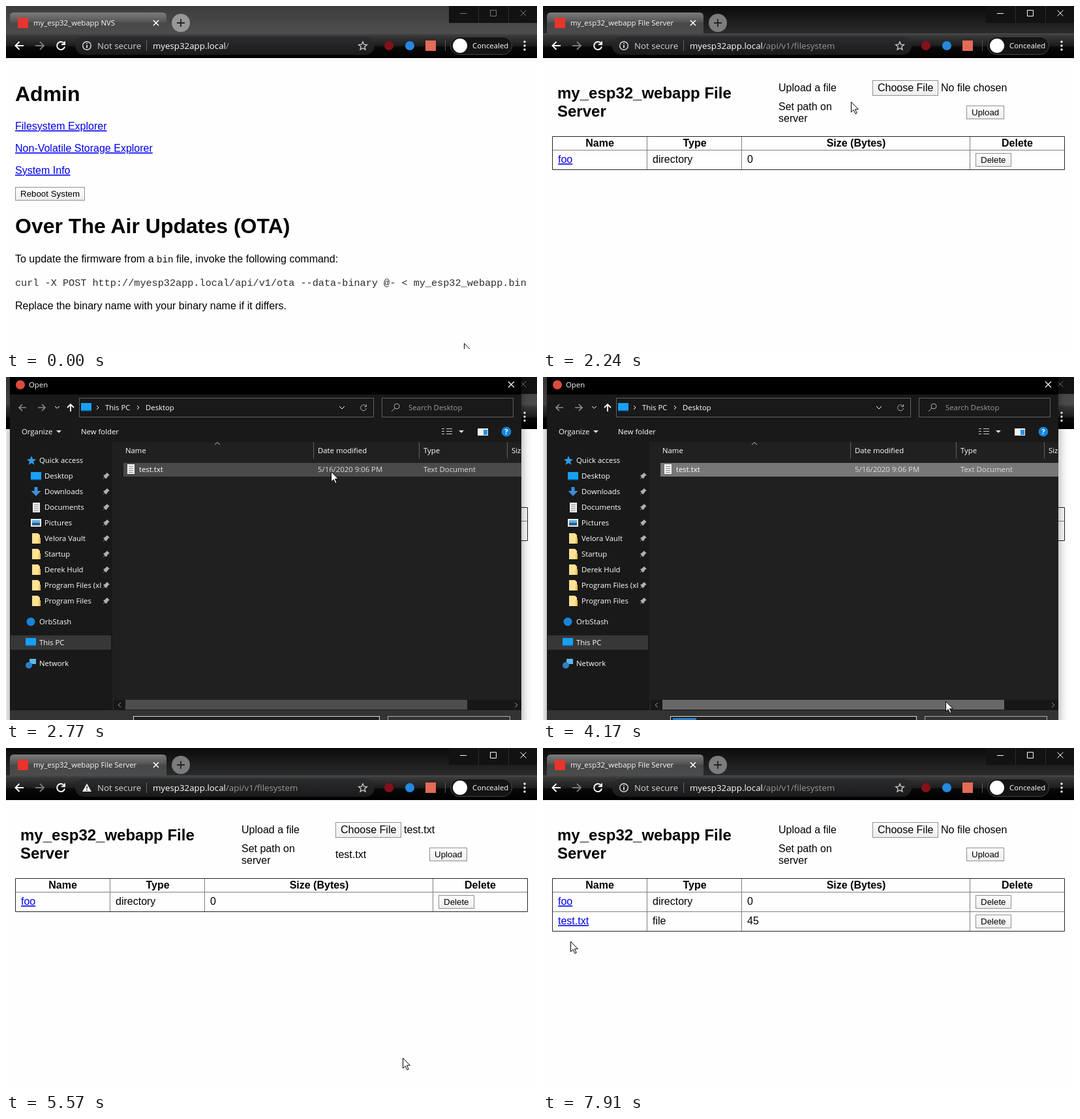
Recreate the animation shown at these times as an HTML page. Size 814 by 527 pixels, loop 7.99 s.

```html
<!DOCTYPE html>
<html lang="en">
<head>
<meta charset="utf-8">
<title>File server demo</title>
<style>
  html, body { margin: 0; width: 100%; height: 100%; overflow: hidden; background: #fefefe; }
  svg { display: block; width: 814px; height: 527px; }
  text { white-space: pre; }
  .page { font: 16px "Liberation Sans", Arial, sans-serif; }
  .page .b { font-weight: bold; }
  .page .btn { font-size: 13.333px; }
  .link { fill: #0000ee; text-decoration: underline; }
  .ui { font: 11.35px "Open Sans", "Noto Sans", sans-serif; fill: #fff; }
  .url { font-size: 13.3px; }
  .line { fill: none; stroke: #fff; }
  .dim { fill: #9a9a9a; }
</style>
</head>
<body>
<svg id="stage" viewBox="0 0 814 527" xmlns="http://www.w3.org/2000/svg"></svg>
<script>
const LOOP = 7990;

// Markup helpers
const text = (x, y, s, attrs = '') => `<text x="${x}" y="${y}" ${attrs}>${s}</text>`;
const rect = (x, y, w, h, fill, attrs = '') =>
  `<rect x="${x}" y="${y}" width="${w}" height="${h}" fill="${fill}" ${attrs}/>`;
const box = (x, y, w, h, fill, stroke, attrs = '') =>
  rect(x + .5, y + .5, w - 1, h - 1, fill, `stroke="${stroke}" ${attrs}`);
const disc = (x, y, r, fill, attrs = '') => `<circle cx="${x}" cy="${y}" r="${r}" fill="${fill}" ${attrs}/>`;
const line = (d, attrs = '') => `<path class="line" d="${d}" ${attrs}/>`;
const group = (id, body, attrs = '') => `<g id="${id}" ${attrs}>${body}</g>`;
const button = (x, y, w, h, label, base, attrs = 'class="btn"') =>
  box(x, y, w, h, 'url(#face)', '#8f8f8f') + text(x + 8, base, label, attrs);

const defs = `<defs>
  <linearGradient id="face" x2="0" y2="1"><stop stop-color="#fefefe"/><stop offset="1" stop-color="#ededed"/></linearGradient>
  <linearGradient id="stripOn" x2="0" y2="1"><stop stop-color="#0b0b0b"/><stop offset="1" stop-color="#2b2b2b"/></linearGradient>
  <linearGradient id="stripOff" x2="0" y2="1"><stop stop-color="#3d3d3d"/><stop offset="1" stop-color="#4e4e4e"/></linearGradient>
  <linearGradient id="tab" x2="0" y2="1"><stop stop-color="#7c7c7c"/><stop offset=".45" stop-color="#555"/><stop offset=".5" stop-color="#484848"/><stop offset="1" stop-color="#4c4c4c"/></linearGradient>
  <linearGradient id="bar" x2="0" y2="1"><stop stop-color="#4c4c4c"/><stop offset=".1" stop-color="#383838"/><stop offset=".5" stop-color="#1d1d1d"/><stop offset=".55" stop-color="#090909"/><stop offset="1" stop-color="#000"/></linearGradient>
  <linearGradient id="pill" x2="0" y2="1"><stop stop-color="#2b2c2e"/><stop offset="1" stop-color="#1a1a1b"/></linearGradient>
  <clipPath id="frame"><rect x="6" y="-3" width="784" height="556"/></clipPath>
  <clipPath id="side"><rect x="6" y="100" width="140" height="400"/></clipPath>
</defs>`;

function adminPage() {
  const links = ['Filesystem Explorer', 'Non-Volatile Storage Explorer', 'System Info'];
  return text(14, 146, 'Admin', 'class="b" font-size="32"')
    + links.map((s, i) => text(14, 190 + 34 * i, s, 'class="link"')).join('')
    + button(14, 278, 107, 21, 'Reboot System', 293)
    + text(14, 349, 'Over The Air Updates (OTA)', 'class="b" font-size="32"')
    + text(14, 394, 'To update the firmware from a <tspan font-family="Liberation Mono, monospace" font-size="14.2">bin</tspan> file, invoke the following command:')
    + text(14, 430, 'curl -X POST http://myesp32app.local/api/v1/ota --data-binary @- &lt; my_esp32_webapp.bin',
      'font-family="Liberation Mono, monospace" font-size="15.19" fill="#2c2c2c"')
    + text(14, 466, 'Replace the binary name with your binary name if it differs.');
}

function tableRow(y, cells) {
  const xs = [23, 168, 313];
  return line(`M14 ${y + .5}H800M159.5 ${y}v30M304.5 ${y}v30M654.5 ${y}v30`, 'style="stroke:#808080"')
    + line(`M14.5 ${y}v30.5H799.5v-30.5`, 'style="stroke:#222"')
    + cells.map((s, i) => text(xs[i], y + 20, s, i ? '' : 'class="link"')).join('')
    + button(663, y + 5, 55, 21, 'Delete', y + 20);
}

function serverPage() {
  const heads = [['Name', 87], ['Type', 232.5], ['Size (Bytes)', 480], ['Delete', 727]];
  return text(22, 142, 'my_esp32_webapp File', 'class="b" font-size="24"')
    + text(22, 170, 'Server', 'class="b" font-size="24"')
    + text(361, 131, 'Upload a file') + text(361, 160, 'Set path on') + text(361, 178, 'server')
    + rect(505, 154, 128, 20, '#ebebe4', 'id="field"')
    + button(505, 114, 101, 24, 'Choose File', 131, 'id="choose"')
    + text(610, 131, '', 'id="chosen"') + text(505, 169, '', 'id="path"')
    + button(649, 153, 58, 21, 'Upload', 168, 'class="btn" id="upload"')
    + line('M14.5 221.5V200.5H799.5V221.5', 'style="stroke:#222"')
    + line('M159.5 201v21M304.5 201v21M654.5 201v21', 'style="stroke:#808080"')
    + heads.map(([s, x]) => text(x, 216, s, 'class="b" text-anchor="middle"')).join('')
    + tableRow(221, ['foo', 'directory', '0'])
    + group('newRow', tableRow(251, ['test.txt', 'file', '45']));
}

function browser() {
  return rect(0, 0, 814, 42, '', 'id="strip"')
    + '<path d="M6 42V16q0-6 6-6H240q6 0 6 6V42z" fill="url(#tab)"/>'
    + rect(0, 42, 814, 38, 'url(#bar)')
    + rect(18, 18, 16, 16, '#e7352c', 'id="icon"')
    + line('M26 19.5a6.5 6.5 0 1 1-6.5 6.5', 'id="spin" stroke-width="2"')
    + text(42, 30, '', 'id="title"')
    + line('M226 22l8 8m0-8l-8 8', 'stroke-width="1.6"')
    + disc(268, 26, 14, '#8c8c8c', 'id="plus"') + line('M262 26h12M268 20v12', 'style="stroke:#222" stroke-width="1.8"')
    + rect(679, 0, 135, 26, '#121212') + line('M724.5 0v26M770.5 0v26', 'style="stroke:#2c2c2c"')
    + line('M696 11.5h10M742.5 6.5h9v9h-9zM788.5 6.5l9 9m0-9l-9 9', 'id="controls"')
    + line('M27 61H14.5m6-6l-6 6 6 6', 'stroke-width="2"')
    + line('M45 61H58m-6-6l6 6-6 6', 'style="stroke:#777" stroke-width="2"')
    + line('M89 57.5a6 6 0 1 0 1 5M90 54.5v4.5h-5', 'stroke-width="2"')
    + rect(106, 47, 459, 28, 'url(#pill)', 'rx="14"')
    + group('info', disc(124, 61, 6.3, 'none', 'stroke="#ddd" stroke-width="1.4"')
      + line('M124 60v4.5M124 57v1.6', 'stroke-width="1.6"'))
    + group('warn', '<path d="M124 54.5l7 12.5h-14z" fill="#eee"/>'
      + line('M124 59v3.5M124 64v1.5', 'style="stroke:#222" stroke-width="1.5"'))
    + text(140, 66, 'Not secure', 'class="url" fill="#d5d5d5"')
    + line('M215.5 53v16', 'style="stroke:#666"')
    + text(225, 66, 'myesp32app.local<tspan id="tail" fill="#999"></tspan>', 'class="url"')
    + line('M547 55l1.8 4.2 4.5.4-3.4 3 1 4.4-3.9-2.3-3.9 2.3 1-4.4-3.4-3 4.5-.4z', 'style="stroke:#ccc" stroke-width="1.4"')
    + disc(587, 61, 7, '#86101a') + disc(619, 61, 7, '#2589e0') + rect(643, 53, 16, 16, '#e36b58')
    + line('M673.5 53v16', 'style="stroke:#555"')
    + rect(681.5, 47.5, 94, 27, '#141414', 'rx="13.5" stroke="#444"') + disc(696, 61, 11, '#fff')
    + text(715, 65, 'Concealed')
    + [55, 61, 67].map(y => disc(795, y, 1.7, '#fff')).join('');
}

// File picker, drawn at its resting place
const monitor = (x, y) => rect(x - 8, y - 6, 16, 11, '#18a0f5') + rect(x - 8, y + 5, 16, 1.5, '#0a65ad');
const folder = (x, y) => `<path d="M${x - 6} ${y - 8}h9l3 3v13h-12z" fill="#ffe394"/>` + rect(x + 4, y - 1, 3, 9, '#f2c14e');
const sheet = (x, y) => rect(x - 5, y - 7, 11, 15, '#f2f2f2')
  + line([-4, -1, 2, 5].map(d => `M${x - 3} ${y + d + .5}h7`).join(''), 'style="stroke:#888"');
const pin = y => `<path d="M155 ${y - 5}l4 4-2 .5-2 3-1.5 2-2-2-3 3 2.5-4-2-2 2-1 2-1.5z" fill="#a9b2b8"/>`;
const down = (x, y) => `<path d="M${x - 2.5} ${y - 7}h5v6h5l-7.5 8-7.5-8h5z" fill="#3f8fd8"/>`;
const picture = (x, y) => rect(x - 8, y - 6, 16, 12, '#eee') + rect(x - 6, y - 4, 12, 4, '#5ab0ee') + rect(x - 6, y, 12, 4, '#315f86');
const globe = (x, y) => rect(x - 2, y - 7, 10, 8, '#5bb8ee') + disc(x - 3, y + 3, 5, '#2d7fc4');
const caret = (x, y) => `<path d="M${x - 4} ${y - 2}h8l-4 4z" fill="#ddd"/>`;

function sidebar() {
  const items = [['Desktop', monitor], ['Downloads', down], ['Documents', sheet], ['Pictures', picture],
    ['Velora Vault', folder], ['Startup', folder], ['Derek Huld', folder],
    ['Program Files (x86)', folder], ['Program Files', folder]];
  return rect(6, 100, 157, 412, '#191919')
    + rect(7, 397, 154, 22, '#373737', 'id="place"')
    + '<path d="M39 121l2 5 5 .5-4 3.5 1.5 5-4.5-3-4.5 3 1.5-5-4-3.5 5-.5z" fill="#2e9be8"/>'
    + text(51, 132, 'Quick access')
    + '<g clip-path="url(#side)">' + items.map(([s, icon], i) =>
      icon(46, 152 + 24 * i) + text(59, 156 + 24 * i, s)).join('') + '</g>'
    + items.map((_, i) => pin(152 + 24 * i)).join('')
    + disc(38, 376, 6.5, '#1685d9') + text(51, 380, 'OrbStash')
    + monitor(38, 407) + text(51, 412, 'This PC') + globe(38, 440) + text(51, 444, 'Network');
}

function picker() {
  const tools = box(112, 32, 452, 30, '#191919', '#606060') + monitor(123, 46)
    + line('M139 44l3 3-3 3M201 44l3 3-3 3M511 45l4 4 4-4M75 45l3.5 3 3.5-3')
    + text(152, 51, 'This PC') + text(214, 51, 'Desktop')
    + line('M552 45a4.5 4.5 0 1 0 .5 3M552.5 42v3.5h-3.5', 'style="stroke:#aaa"')
    + line('M31 47H20m5-5l-5 5 5 5M49 47h11m-5-5l5 5-5 5', 'style="stroke:#8b8b8b" stroke-width="1.7"')
    + line('M99 53V42m-5 5l5-5 5 5', 'stroke-width="1.8"')
    + box(576, 32, 202, 30, '#191919', '#606060')
    + disc(599, 45, 4, 'none', 'stroke="#aaa"') + line('M596 48l-5 5', 'style="stroke:#aaa"')
    + text(617, 51, 'Search Desktop', 'class="dim"')
    + text(24, 88, 'Organize') + caret(81, 84) + text(115, 88, 'New folder')
    + line('M668 79.5h4M668 83.5h4M668 87.5h4M675 79.5h9M675 83.5h9M675 87.5h9', 'style="stroke:#ccc"') + caret(698, 84);
  return '<rect x="6" y="-3" width="784" height="556" fill="#000" opacity=".4" style="filter:blur(8px)"/>'
    + '<g clip-path="url(#frame)">'
    + rect(6, -3, 784, 556, '#202020') + rect(6, -3, 784, 30, '#000') + rect(6, 70, 784, 30, '#191919')
    + rect(6, 27, 784, 43, '', 'id="address"')
    + disc(22, 12, 7, '#dd4b3e') + text(35, 16, 'Open') + line('M770 7l9 9m0-9l-9 9', 'stroke-width="1.2"')
    + group('tools', tools)
    + rect(723, 79, 16, 11, '#f2f2f2') + rect(732, 81, 6, 8, '#2294e0')
    + disc(767, 84, 7.5, '#1683d8') + text(767, 88, '?', 'text-anchor="middle" font-weight="bold"')
    + sidebar()
    + line('M320 104l4-3.5 4 3.5', 'style="stroke:#bbb"')
    + line('M471.5 100v25M633.5 100v25M768.5 100v25', 'style="stroke:#636363"')
    + text(183, 117, 'Name') + text(478, 117, 'Date modified') + text(640, 117, 'Type') + text(775, 117, 'Size')
    + rect(180, 132, 611, 21, '', 'id="row"')
    + sheet(191, 141) + text(204, 146, 'test.txt')
    + text(478, 146, '5/16/2020 9:06 PM', 'fill="#dedede"') + text(640, 146, 'Text Document', 'fill="#dedede"')
    + rect(166, 496, 624, 16, '#171717') + rect(183, 496, 524, 15, '', 'id="thumb"')
    + line('M176 500.5l-4 3.5 4 3.5M780 500.5l4 3.5-4 3.5', 'style="stroke:#999"')
    + rect(6, 512, 784, 41, '#333')
    + text(135, 535, 'File name:')
    + box(195, 521, 378, 22, '#202020', '#ddd') + rect(199, 524, 36, 16, '#2a80c8', 'id="mark"')
    + text(198, 535, '', 'id="name"') + line('M562 530l4 4 4-4')
    + box(585, 521, 188, 22, '', '#aaa', 'id="filter"') + text(588, 535, 'All Files (*.*)')
    + '</g>';
}

const stage = document.getElementById('stage');
stage.innerHTML = defs + rect(0, 0, 814, 527, '#fefefe')
  + group('admin', adminPage(), 'class="page"') + group('server', serverPage(), 'class="page"')
  + group('bubble', '<path id="bubbleBox" fill="#292a2d"/>' + text(3, 526, '', 'id="bubbleText" fill="#dcdcdc"'), 'class="ui"')
  + group('browser', browser(), 'class="ui"')
  + group('dialog', picker(), 'class="ui"')
  + '<path id="cursor" d="M.5.5V16l3.6-3.4 2.8 6 2.3-1-2.7-5.9h4.9z" fill="#fff" stroke="#000"/>';

const el = {};
stage.querySelectorAll('[id]').forEach(n => el[n.id] = n);
const show = (n, on) => n.style.display = on ? '' : 'none';
const put = (n, s) => { if (n.textContent !== s) n.textContent = s; };
const fill = (n, c) => n.setAttribute('fill', c);

// Pointer moves: first step, last step, count, end x, end y
const START = [702, 518];
const MOVES = [
  [70, 680, 9, 107, 184], [1320, 1400, 2, 125, 185], [1480, 1580, 2, 140, 166],
  [1660, 2380, 10, 510, 145], [2700, 3240, 8, 228, 134], [3320, 3320, 1, 218, 134],
  [3620, 3620, 1, 219, 123], [3700, 4170, 7, 617, 498], [4250, 4330, 2, 645, 540],
  [5280, 5280, 1, 600, 540], [5360, 6140, 11, 644, 190], [6190, 6430, 4, 676, 165],
  [6830, 7910, 14, 42, 297]
];
const ease = u => u * u * (3 - 2 * u);

function pointer(t) {
  let [x, y] = START;
  for (const [a, b, n, ex, ey] of MOVES) {
    if (t < a) break;
    const step = n > 1 ? Math.min(n, Math.floor((t - a) / (b - a) * (n - 1) + 1e-6) + 1) : 1;
    const k = ease(step / n);
    x += (ex - x) * k;
    y += (ey - y) * k;
  }
  return [Math.round(x), Math.round(y)];
}

// Value of the last step whose time has come
const held = (t, steps) => steps.reduce((v, s) => t >= s[0] ? s[1] : v, steps[0][1]);

const FADE = [[0, 0], [2460, .12], [2540, .48], [2620, .85], [2700, 1], [4960, .8], [5040, .4], [5090, .143], [5200, 0]];
const SCALE = [[0, .965], [2540, .974], [2620, .993], [2700, 1], [4960, .99], [5040, .974], [5090, .9617]];
const BUBBLE = [[0, 0], [840, .6], [920, 1], [1400, .7], [1480, .35], [1580, 0], [6830, 1], [7610, .6], [7690, .3], [7770, 0]];
const THUMB = [[0, '#4d4d4d'], [4090, '#686868'], [4570, '#5a5a5a'], [4810, '#4d4d4d']];

function drawBrowser(t) {
  const server = t >= 1240, picked = t >= 4960 && t < 7530;
  const focused = t >= 1080 && t < 2380 || t >= 4960;
  const busy = t >= 6510 && t < 7530, loading = t >= 6830 && t < 7610;
  const warned = t >= 2380 && t < 7530, waiting = t > 5000;

  show(el.admin, !server);
  show(el.server, server);
  show(el.newRow, t >= 7530);
  put(el.title, 'my_esp32_webapp ' + (server ? 'File Server' : 'NVS'));
  put(el.tail, server ? '/api/v1/filesystem' : '/');
  put(el.chosen, picked ? 'test.txt' : 'No file chosen');
  put(el.path, picked ? 'test.txt' : '');
  show(el.field, busy);
  fill(el.path, busy ? '#545454' : '#000');
  for (const label of [el.choose, el.upload]) fill(label, busy ? '#777' : '#000');

  fill(el.strip, focused ? 'url(#stripOn)' : 'url(#stripOff)');
  fill(el.plus, focused ? '#7c7c7c' : '#979797');
  el.controls.style.stroke = focused ? '#fff' : '#777';
  show(el.info, !warned);
  show(el.warn, warned);
  show(el.icon, !loading);
  show(el.spin, loading);
  el.spin.setAttribute('transform', `rotate(${Math.floor(t / 80) * 40 % 360} 26 26)`);

  put(el.bubbleText, waiting ? 'Waiting for myesp32app.local...' : 'myesp32app.local/api/v1/filesystem');
  el.bubbleBox.setAttribute('d', `M0 511H${waiting ? 171 : 195}q4 0 4 4V527H0z`);
  el.bubble.style.opacity = held(t, BUBBLE);
}

function drawPicker(t) {
  const fade = held(t, FADE), k = held(t, SCALE);
  const painted = t >= 2620, selected = t >= 3540;
  show(el.dialog, fade > 0);
  el.dialog.style.opacity = fade;
  el.dialog.setAttribute('transform', k < 1 ? `translate(398 275) scale(${k}) translate(-398 -275)` : '');
  // Some controls are still blank while the window opens
  show(el.tools, painted);
  show(el.place, painted);
  fill(el.address, painted ? '#191919' : '#fff');
  fill(el.filter, painted ? '#333' : '#fff');
  fill(el.row, selected ? '#777' : '#4a4a4a');
  fill(el.thumb, held(t, THUMB));
  show(el.mark, selected);
  put(el.name, selected ? 'test.txt' : '');
}

const began = performance.now();
function tick() {
  const t = (performance.now() - began) % LOOP;
  drawBrowser(t);
  drawPicker(t);
  el.cursor.setAttribute('transform', `translate(${pointer(t)})`);
  requestAnimationFrame(tick);
}
tick();
</script>
</body>
</html>
```
